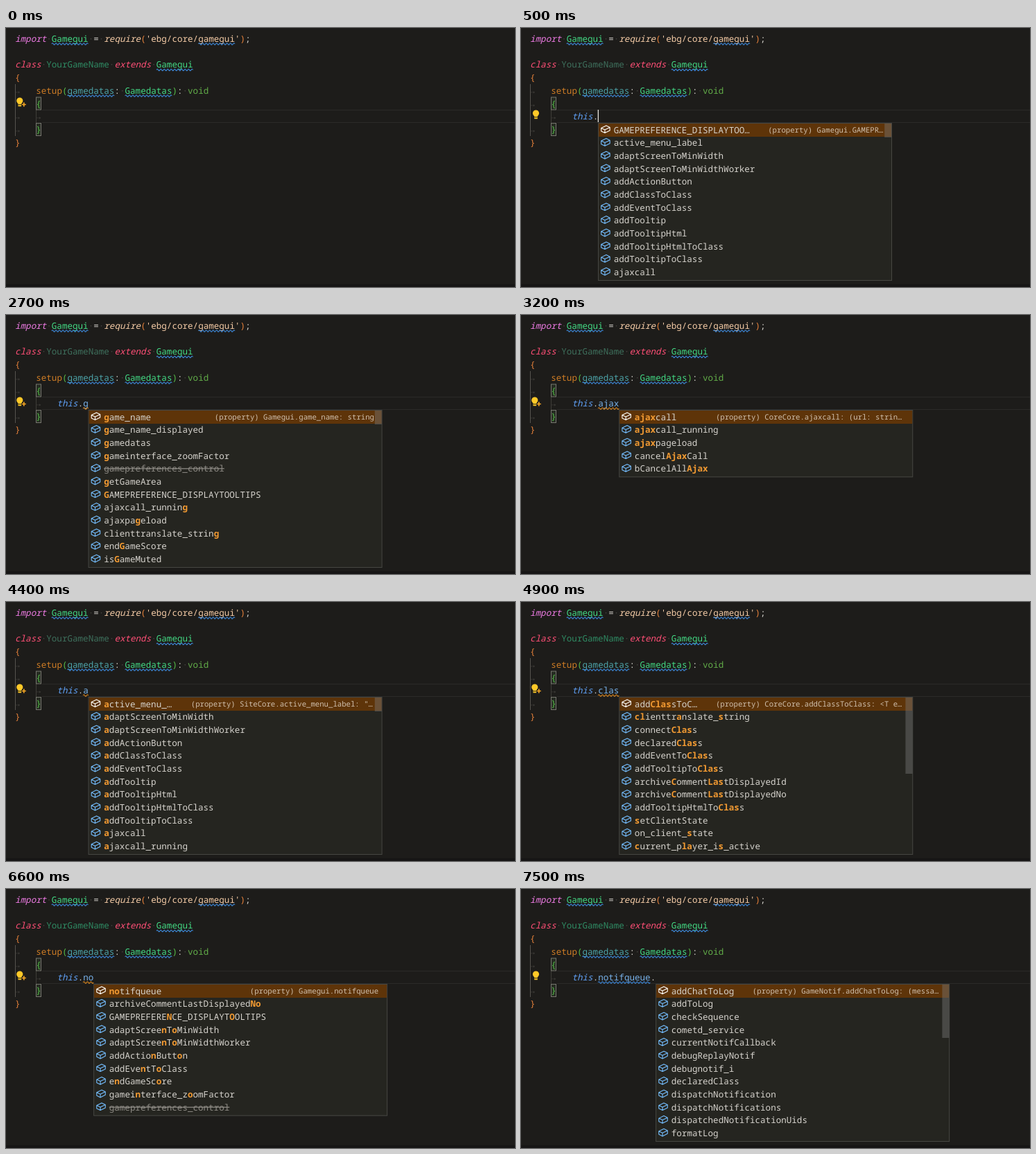
Write an HTML page that moves like this. It is 734 by 374 pixels and loops after 8000 ms.

```html
<!DOCTYPE html>
<html lang="en">
<head>
<meta charset="utf-8">
<title>Editor autocomplete</title>
<style>
html, body { margin: 0; width: 100%; height: 100%; overflow: hidden; background: #1d1c1a; }
svg { display: block; }
text { font: 12.593px "Noto Sans Mono", "DejaVu Sans Mono", monospace; white-space: pre; text-rendering: geometricPrecision; fill: #d6d3cd; }
.detail { font-size: 10.66px; fill: #d0c0ae; }
.import { fill: #ee7be4; font-style: italic; }
.keyword { fill: #ff4f76; font-style: italic; }
.type { fill: #43d984; }
.name { fill: #2f8a63; }
.dim { fill: #3e6f5c; }
.call { fill: #f4cba6; font-style: italic; }
.string { fill: #f4cba6; }
.outer { fill: #e5803a; }
.inner { fill: #55bd48; }
.method { fill: #cf7d25; }
.param { fill: #4da3a8; }
.void { fill: #62ad49; }
.this { fill: #5e9ef2; font-style: italic; font-weight: 500; }
.member { fill: #78b2ea; }
.space { fill: #474541; }
.hit { fill: #f29a32; font-weight: 600; }
.old { fill: #8d8a84; text-decoration: line-through; }
path { fill: none; }
</style>
</head>
<body>
<svg id="stage" width="734" height="374" viewBox="0 0 734 374"></svg>
<script>
const stage = document.getElementById("stage");
const LOOP = 8000, STEP = 100, CHAR = 7.556, LEFT = 13, ROW = 18.667;

// Each character is one step; "<" is backspace.
const keys = [
  [100, "this."], [1500, "g"], [1500, "a"], [1700, "me"], [2000, "_"],
  [2400, "<<<<<ajax"], [4200, "<<<<class"], [6000, "<<<<<notifqueue."]
];

const words = s => s.split(" ");
const members = words("GAMEPREFERENCE_DISPLAYTOOLTIPS active_menu_label adaptScreenToMinWidth " +
  "adaptScreenToMinWidthWorker addActionButton addClassToClass addEventToClass addTooltip addTooltipHtml " +
  "addTooltipHtmlToClass addTooltipToClass ajaxcall ajaxcall_running ajaxpageload archiveCommentLastDisplayedId " +
  "archiveCommentLastDisplayedNo cancelAjaxCall bCancelAllAjax clienttranslate_string connectClass " +
  "current_player_is_active declaredClass endGameScore game_name game_name_displayed gamedatas " +
  "gameinterface_zoomFactor gamepreferences_control getGameArea isGameMuted notifqueue onGameUpdate " +
  "on_client_state setClientState setGameState showGameLog");

// Square brackets mark highlighted letters.
const fixedLists = {
  clas: words("addClassToClass [cl]ienttr[a]nslate_[s]tring connect[Clas]s declared[Clas]s addEventTo[Clas]s " +
    "addTooltipTo[Clas]s archive[C]omment[Las]tDisplayedId archive[C]omment[Las]tDisplayedNo " +
    "addTooltipHtmlTo[Clas]s [s]etClientState on_client_[s]tate [c]urrent_p[la]yer_i[s]_active"),
  "notifqueue.": words("addChatToLog addToLog checkSequence cometd_service currentNotifCallback debugReplayNotif " +
    "debugnotif_i declaredClass dispatchNotification dispatchNotifications dispatchedNotificationUids formatLog")
};
const thumbHeights = { clas: 110, "notifqueue.": 77 };

// First row: shortened label, detail, detail offset.
const details = {
  GAMEPREFERENCE_DISPLAYTOOLTIPS: ["GAMEPREFERENCE_DISPLAYTOO…", "Gamegui.GAMEPR…", 245],
  game_name: ["game_name", "Gamegui.game_name: string", 182],
  ajaxcall: ["ajaxcall", "CoreCore.ajaxcall: (url: strin…", 139.5],
  active_menu_label: ["active_menu_…", 'SiteCore.active_menu_label: "…', 148],
  addClassToClass: ["addClassToC…", "CoreCore.addClassToClass: <T e…", 139.5],
  addChatToLog: ["addChatToLog", "GameNotif.addChatToLog: (messa…", 139.5]
};

const column = n => LEFT + n * CHAR;
const escapeText = s => s.replace(/</g, "&lt;");
const rect = (x, y, w, h, fill, extra = "") =>
  `<rect x="${x}" y="${y}" width="${w}" height="${h}" fill="${fill}" ${extra}/>`;
const label = (x, y, body, cls = "") => `<text x="${x}" y="${y}" class="${cls}">${body}</text>`;
const span = (cls, s) => `<tspan class="${cls}">${escapeText(s)}</tspan>`;

// Code line from "class|text" pairs; the first line is 0.
const code = (line, col, ...parts) =>
  label(column(col), 20 + line * 18.72, parts.map(p => span(...p.split("|"))).join(""));

const squiggle = (col, length, y, color) => {
  const n = Math.max(2, Math.round(length * CHAR / 2.5));
  return `<path d="M${column(col)} ${y}q1.25 -2.6 2.5 0${"t2.5 0".repeat(n - 1)}" stroke="${color}" stroke-width="1.1"/>`;
};

function isMatch(name, query) {
  let i = 0;
  for (const c of name.toLowerCase()) if (c === query[i]) i++;
  return i >= query.length;
}

function rank(name, query) {
  if (name.startsWith(query)) return 0;
  if (name[0] === query[0]) return 1;
  return name.toLowerCase().includes(query) ? 2 : 3;
}

function suggestions(query) {
  return fixedLists[query] ||
    members.filter(n => isMatch(n, query)).sort((a, b) => rank(a, query) - rank(b, query));
}

function highlight(name, query) {
  if (name === "gamepreferences_control") return span("old", name);
  if (name.includes("["))
    return name.split(/[[\]]/).map((s, i) => span(i % 2 ? "hit" : "", s)).join("");
  const lower = name.toLowerCase(), at = lower.indexOf(query);
  let i = 0;
  return [...name].map((c, k) => {
    const hit = at >= 0 ? k >= at && k < at + query.length : lower[k] === query[i];
    if (hit) i++;
    return span(hit ? "hit" : "", c);
  }).join("");
}

const cube = (x, y, color) =>
  `<path transform="translate(${x} ${y}) scale(.96)" stroke="${color}" stroke-width="1.15" stroke-linejoin="round"
    d="M1.5 6.2L9 2.5L14.5 5.2V9.9L7 13.6L1.5 10.9ZM1.5 6.2L7 8.8L14.5 5.2M7 8.8V13.6"/>`;

function popup(x, query) {
  const all = suggestions(query), rows = all.slice(0, 12);
  if (!rows.length) return "";
  let out = rect(x + .3, 137.5, 423, rows.length * ROW + 3, "#252520", 'stroke="#474743"');
  out += rect(x + .8, 138, 422, 19, "#5e3409");
  rows.forEach((name, i) => {
    const y = 151.5 + i * ROW;
    let shown = name;
    if (!i) {
      const full = "Gamegui." + name;
      const short = full.length > 19 ? full.slice(0, 18) + "…" : full;
      const [title, detail, offset] = details[name] || [name, short, 411 - (short.length + 11) * 6.4];
      shown = title;
      out += label(x + offset, y - .5, escapeText("(property) " + detail), "detail");
    }
    const marks = query.endsWith(".") ? "" : query;
    out += cube(x + 3, y - 13, i ? "#75beff" : "#fff") + label(x + 22.4, y, highlight(shown, marks));
  });
  const thumb = thumbHeights[query] || (all.length > 12 ? 20 : 0);
  return out + (thumb ? rect(x + 413, 138, 10, thumb, "#797979", 'opacity=".42"') : "");
}

function bulb(x, y, spark) {
  return `<circle cx="${x}" cy="${y}" r="4.6" fill="#ffc928"/>` + rect(x - 2.3, y + 3, 4.6, 5.2, "#ffc928") +
    rect(x - 2.3, y + 5.3, 4.6, 1, "#1d1c1a") +
    (spark ? `<path d="M${x + 6} ${y + 2.5}v6M${x + 3} ${y + 5.5}h6" stroke="#f6a623" stroke-width="1.7"/>` : "");
}

function draw(text) {
  const query = text.slice(5), member = query.replace(".", "");
  const nameClass = text && !/cl|\.n/.test(text) ? "dim" : "name";
  const open = text.startsWith("this.");
  const blue = "#3f8fe6";
  let out = rect(0, 0, 734, 374, "#1d1c1a") + rect(0, 370, 734, 4, "#161515");
  out += rect(52, 118, 682, 1, "#2b2a28") + rect(52, 136, 682, 1, "#2b2a28");
  out += rect(13, 81, 1, 75, "#56534e") + rect(43, 118, 1, 19, "#3f3d39");
  for (const y of [100, 137.5]) out += rect(43.5, y, 7, 18, "#262c22", 'stroke="#77766f"');

  out += code(0, 0, "import|import", "space|·", "type|Gamegui", "space|·", "|=", "space|·", "call|require",
    "outer|(", "string|'ebg/core/gamegui'", "outer|)", "|;");
  out += code(2, 0, "keyword|class", "space|·", nameClass + "|YourGameName", "space|·", "keyword|extends",
    "space|·", "type|Gamegui");
  out += code(3, 0, "outer|{");
  out += code(4, 4, "method|setup", "inner|(", "param|gamedatas", "|:", "space|·", "type|Gamedatas", "inner|)",
    "|:", "space|·", "void|void");
  out += code(5, 4, "inner|{") + code(7, 4, "inner|}") + code(8, 0, "outer|}");
  for (const line of [4, 5, 6, 7])
    if (line !== (text ? 6 : 5)) out += code(line, 0, "space|→");
  out += code(6, 4, "space|→");
  out += code(6, 8, "this|" + text.slice(0, 4), "|" + text.slice(4, 5), "member|" + member,
    "|" + (query.endsWith(".") ? "." : ""));

  for (const [col, length, y] of [[7, 7, 23], [35, 7, 23], [27, 7, 60.5], [10, 9, 98], [21, 9, 98]])
    out += squiggle(col, length, y, blue);
  if (member) out += squiggle(13, member.length, 135, query.endsWith(".") ? blue : "#e58d20");

  out += text ? bulb(query && !query.endsWith(".") ? 19.8 : 21.5, 123, query && !query.endsWith("."))
    : bulb(19.8, 105, true);
  const x = column(8 + text.length);
  if (open) out += popup(x, query);
  if (open && !query) out += rect(x - .5, 118, 1.3, 18, "#e4e2dc");
  stage.innerHTML = out;
}

function textAt(time) {
  let text = "";
  for (const [start, chars] of keys)
    [...chars].forEach((c, i) => {
      if (time >= start + i * STEP) text = c === "<" ? text.slice(0, -1) : text + c;
    });
  return text;
}

let drawn = null;
function tick() {
  const text = textAt(performance.now() % LOOP);
  if (text !== drawn) draw(drawn = text);
  requestAnimationFrame(tick);
}
tick();
</script>
</body>
</html>
```
